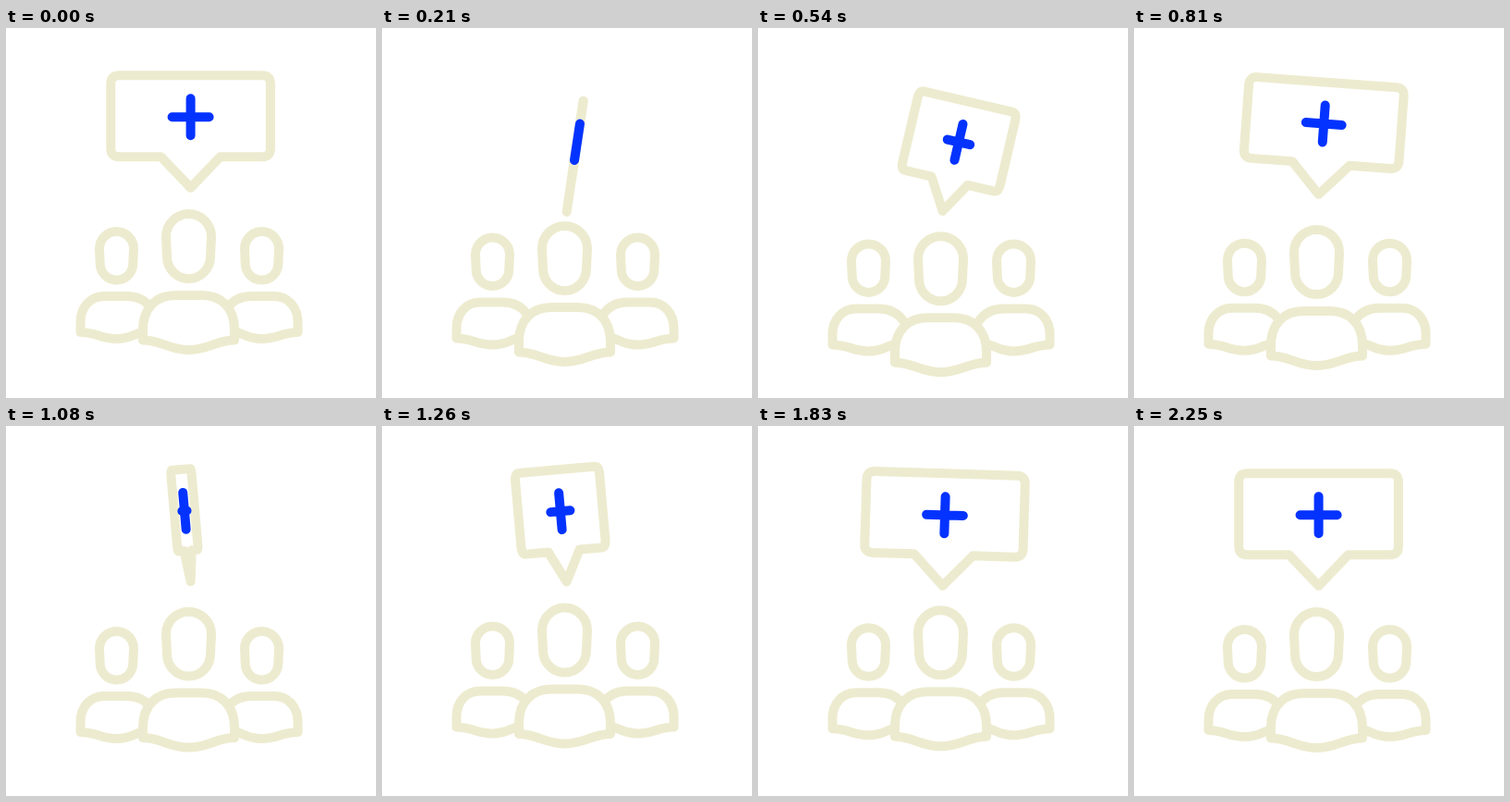
These frames come from a looping animation (400x400 px, 2.34 s). An HTML page:

```html
<!DOCTYPE html>
<html lang="en">
<head>
<meta charset="utf-8">
<title>Team support</title>
<style>
  html, body { margin: 0; width: 100%; height: 100%; overflow: hidden; background: #fff; }
  svg { display: block; width: 100%; height: 100%; }
  path { fill: #fff; stroke: #edebcf; stroke-width: 10; stroke-linecap: round; stroke-linejoin: round; }
  #cross { stroke: #0433ff; }
</style>
</head>
<body>
<svg viewBox="0 0 400 400">
  <defs>
    <g id="member">
      <path d="M101 238.5A18.5 18.5 0 0 1 138 238.5L137.3 254.5A17.8 18 0 0 1 101.7 254.5Z"/>
      <path d="M157 303C152 296 145 290 131 290H106C91 290 80.5 302 80.5 318V329C97 329 103 336 119.5 336S138 330 150 328"/>
    </g>
  </defs>
  <g id="sides">
    <use href="#member"/>
    <use href="#member" transform="translate(396) scale(-1 1)"/>
  </g>
  <g id="leader">
    <path d="M173 225.5A24.5 24.5 0 0 1 222 225.5L221 247A23.5 24 0 0 1 174 247Z"/>
    <path d="M148 337.5V326C148 302 163 289 183 289H212C232 289 247 302 247 326V337.5C227 337.5 219 348 197.5 348S168 337.5 148 337.5Z"/>
  </g>
  <g id="bubble">
    <path id="outline"/>
    <path id="cross"/>
  </g>
</svg>
<script>
const LOOP = 2340, STEP = 30, LAST = 2250;
const el = id => document.getElementById(id);

// Leaves zero at speed, then eases from one [time, value] turning point to the next.
function swing(...turns) {
  return t => {
    let [from, a] = [0, 0];
    for (const [to, b] of turns) {
      if (t < to) {
        const u = (t - from) / (to - from);
        return a + (b - a) * (from ? (1 - Math.cos(Math.PI * u)) / 2 : Math.sin(Math.PI * u / 2));
      }
      [from, a] = [to, b];
    }
    return a;
  };
}

const leaderY = swing([590, 24.4], [1240, -4.5], [LAST, 0]);
const sidesY = swing([690, 14.2], [1330, -4.1], [LAST, 0]);
const bubbleY = swing([330, 31], [1120, -5], [1750, 0]);
const tilt = swing([480, 13.5], [1150, -5.5], [1830, 1.8], [LAST, 0]);

// One and a half turns about the upright axis: steady at first, then slowing to rest.
function spin(t) {
  const total = 540, speed = 0.428, coast = 850;
  if (t < coast) return speed * t;
  const left = total - speed * coast;
  return total - left * (1 - speed * (t - coast) / (5 * left)) ** 5;
}

// Bubble geometry is relative to the tip of its tail; only x is squeezed.
function bubblePath(s) {
  const w = 86.3, top = -121.5, bottom = -33.5, r = 9;
  const p = (x, y) => `${(x * s).toFixed(2)} ${y} `;
  const half = d => `L${p(d * 32, bottom)}L${p(d * (w - r), bottom)}Q${p(d * w, bottom)}${p(d * w, bottom - r)}`
    + `L${p(d * w, top + r)}Q${p(d * w, top)}${p(d * (w - r), top)}`;
  const left = `M${p(0, 0)}${half(-1)}L${p(0, top)}`;
  const right = `M${p(0, 0)}${half(1)}L${p(0, top)}`;
  return left + right;
}

function move(id, x, y, angle = 0) {
  el(id).setAttribute('transform', `translate(${x} ${y}) rotate(${angle})`);
}

function draw(now) {
  const t = Math.min(LAST, Math.floor(now % LOOP / STEP) * STEP);
  const s = Math.cos(spin(t) * Math.PI / 180), arm = 20 * s;
  move('leader', 0, leaderY(t));
  move('sides', 0, sidesY(t));
  move('bubble', 199.6, 172.8 + bubbleY(t), tilt(t));
  el('outline').setAttribute('d', bubblePath(s));
  el('cross').setAttribute('d', `M${-arm} -76.5H${arm}M0 -96.5V-56.5`);
}

const start = performance.now();
function tick() {
  draw(performance.now() - start);
  requestAnimationFrame(tick);
}
tick();
</script>
</body>
</html>
```
